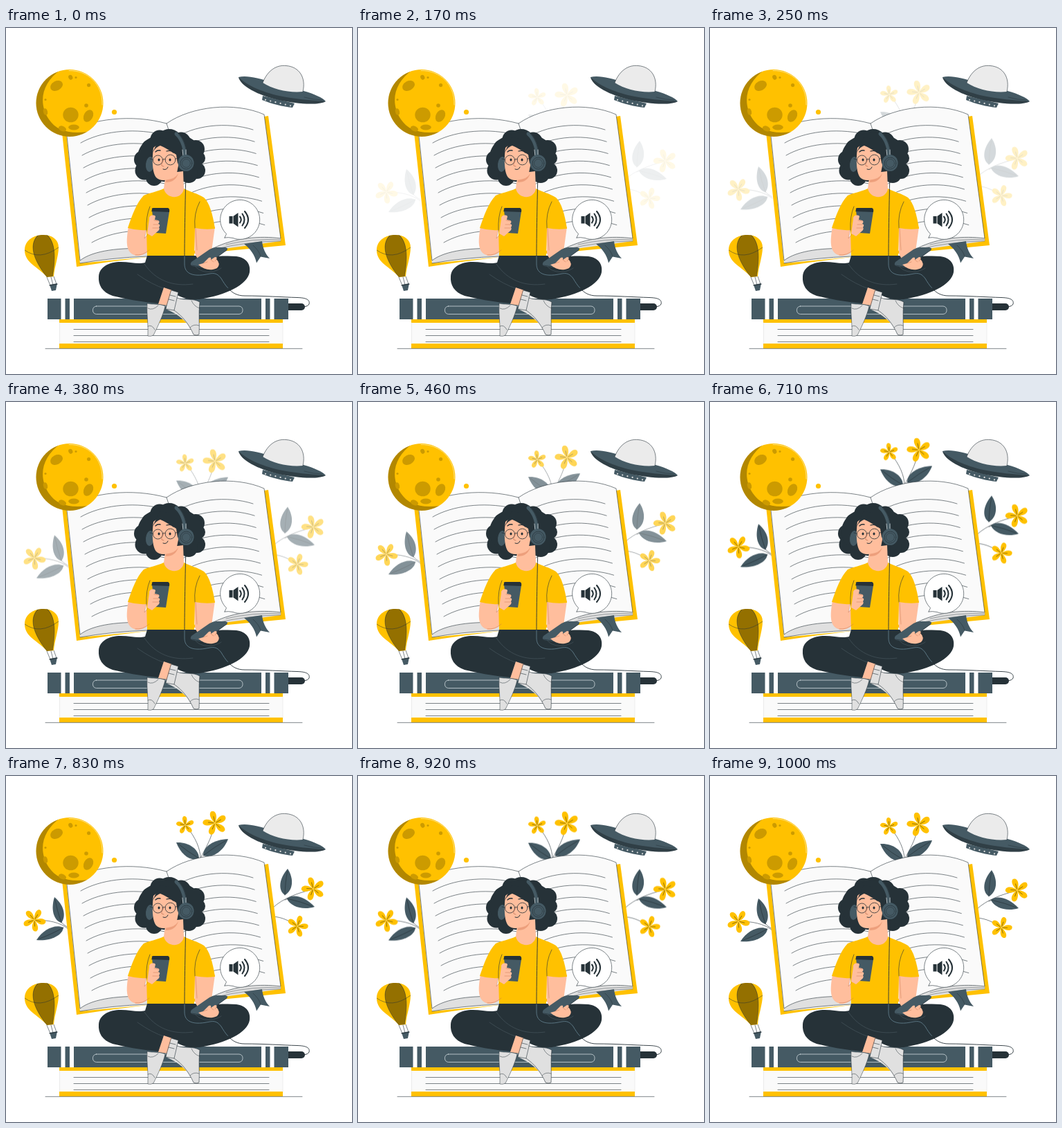
Recreate the animation shown at these times as an HTML page with a canvas. Size 500x500 px, loop 1.04 s.

```html
<!DOCTYPE html>
<html lang="en">
<head>
<meta charset="utf-8">
<title>Audiobook</title>
<style>
html, body { margin: 0; width: 100%; height: 100%; overflow: hidden; background: #fff; }
canvas { display: block; width: 500px; height: 500px; }
</style>
</head>
<body>
<canvas id="stage"></canvas>
<script>
const SIZE = 500, LOOP = 1040, FPS = 24;
const YELLOW = '#ffc100', SLATE = '#455a64', DARK = '#263238';
const SKIN = '#ffbe9d', PAPER = '#fafafa', GREY = '#e0e0e0', SHADE = 'rgba(0,0,0,.2)', DEEP = 'rgba(0,0,0,.3)';
const dpr = window.devicePixelRatio || 1;
const stage = document.getElementById('stage');
const view = setup(stage);
let c;

function setup(canvas) {
  canvas.width = canvas.height = SIZE * dpr;
  const g = canvas.getContext('2d');
  g.scale(dpr, dpr);
  g.lineCap = g.lineJoin = 'round';
  return g;
}

function layer(draw) {
  const canvas = document.createElement('canvas');
  c = setup(canvas);
  draw();
  return canvas;
}

function fill(color, d) {
  c.fillStyle = color;
  c.fill(new Path2D(d));
}

function line(d, width = .6, color = DARK) {
  c.strokeStyle = color;
  c.lineWidth = width;
  c.stroke(new Path2D(d));
}

function oval(color, x, y, rx, ry = rx, deg = 0) {
  c.fillStyle = color;
  c.beginPath();
  c.ellipse(x, y, rx, ry, deg * Math.PI / 180, 0, 7);
  c.fill();
}

function ring(x, y, r, width = .6, color = DARK) {
  c.strokeStyle = color;
  c.lineWidth = width;
  c.beginPath();
  c.arc(x, y, r, 0, 7);
  c.stroke();
}

function box(color, x, y, w, h) {
  c.fillStyle = color;
  c.fillRect(x, y, w, h);
}

function at(x, y, deg, draw) {
  c.save();
  c.translate(x, y);
  c.rotate(deg * Math.PI / 180);
  draw();
  c.restore();
}

function leaf(x, y, tipX, tipY, w) {
  const len = Math.hypot(tipX - x, tipY - y);
  const deg = Math.atan2(tipY - y, tipX - x) * 180 / Math.PI;
  at(x, y, deg, () => {
    fill(SLATE, `M0 0C${len * .15} ${-w} ${len * .6} ${-w} ${len} 0C${len * .65} ${w} ${len * .2} ${w} 0 0`);
    line(`M0 0Q${len * .5} -1.5 ${len * .9} 0`, .6);
  });
}

function flower(x, y, r, deg) {
  for (let i = 0; i < 5; i++) at(x, y, deg + i * 72, () => {
    fill(YELLOW, `M0 0C${-r * .2} ${-r * .25} ${-r * .42} ${-r * .8} ${-r * .12} ${-r}C${r * .25} ${-r * 1.08} ${r * .4} ${-r * .55} 0 0`);
    line(`M0 ${-r * .12}L0 ${-r * .55}`, .8, '#806100');
  });
}

function plants() {
  line('M281 121C281 107 274 91 261 75M281 121C287 108 297 94 301 72');
  leaf(279, 121, 246, 98, 11);
  leaf(285, 117, 321, 93, 11);
  flower(259, 73, 13, -4);
  flower(302, 70, 17.5, -12);

  line('M90 223C78 213 60 210 42 210M90 221Q82 217 79 212');
  leaf(80, 214, 70, 177, 10);
  leaf(83, 221, 44, 239, 10);
  flower(41, 210, 16.5, 32);

  line('M386 192C400 179 421 171 443 166M386 205C400 206 411 212 420 219M403 181Q409 178 414 181');
  leaf(403, 174, 407, 136, 11);
  leaf(406, 179, 446, 191, 10);
  flower(444, 165, 17, -15);
  flower(421, 219, 15.5, 20);
}

function openBook() {
  fill(YELLOW, 'M81 151L102 345Q153 337 204 331L310 323L404 314L379 127L373 128Z');
  fill(PAPER, 'M87 151C125 131 181 124 232 138C268 113 330 106 373 125L397 305L204 331L107 340Z');
  fill(GREY, 'M107 336C126 321 167 317 204 319V330Q152 332 107 340Z');
  fill(GREY, 'M300 318C330 303 367 300 397 304V308L300 321Z');
  line('M87 151C125 131 181 124 232 138C268 113 330 106 373 125L397 304C367 300 330 303 300 318M88 156L107 336C126 321 167 317 204 319M107 340Q152 332 204 330M232 138L236 150');
  line('M300 320Q350 308 397 308M318 313Q356 304 397 306', .4);
  for (let i = 0; i < 9; i++) {
    line(`M${108 + 2 * i} ${166 + 18 * i}c28 -16 72 -22 114 -13`);
    line(`M${241 + 2.1 * i} ${161 + 17.2 * i}c30 -21 78 -26 116 -14`);
  }
  fill(SLATE, 'M344 312L370 308C371 318 375 327 381 333L368 330.5L362 339.5C360 328 352 318 344 312Z');
  line('M357 314Q366 322 368 330', .5);
}

function moon() {
  c.save();
  c.clip(new Path2D('M43.5 108.5a48.5 48.5 0 1 0 97 0a48.5 48.5 0 1 0 -97 0'));
  box(YELLOW, 43, 59, 98, 99);
  fill(DEEP, 'M82 58C53 77 45 106 62 132C72 147 90 154 118 150L104 162H40V58Z');
  oval('#cc9a00', 73, 83.5, 9.5, 6.8, -28);
  oval(SHADE, 93.3, 71.3, 3, 3.6, -25);
  oval(SHADE, 101, 71.5, 1.6);
  oval(SHADE, 119.6, 82.6, 2.6);
  oval(SHADE, 93.5, 125.5, 11.2, 10.8);
  oval(SHADE, 119, 127, 6.5, 9.3, 28);
  oval(SHADE, 98, 143.5, 7.8, 4);
  oval('#cc9a00', 81.5, 145.5, 5.8, 3.7, 25);
  oval(SHADE, 116, 112, 2.8);
  oval('#cc9a00', 57, 121, 3, 4.8, -15);
  oval(SHADE, 57, 103.5, 1.6);
  c.restore();
  line('M91 61.5C119 61 140 82 139 111', .7, '#fff1bd');
  oval(YELLOW, 156.5, 121.5, 3.6);
}

function saucer() {
  fill(SLATE, 'M371 98L370 104C382 109 401 114 414 115L417 109Z');
  for (let i = 0; i < 6; i++) oval(GREY, 375 + i * 7.2, 103.8 + i * 1.7, 1.1);
  fill(SLATE, 'M336 71C347 68 365 72 385 79L430 91C445 95 458 101 462 106C451 112 421 110 394 104C364 97 339 84 336 71Z');
  fill(DEEP, 'M336 71C349 84 374 94 400 99C427 104 449 105 462 106C451 112 421 110 394 104C364 97 339 84 336 71Z');
  fill('#ebebeb', 'M371 79C378 61 391 53 405 54.5C424 56 434 72 429 92C410 94 386 89 371 79Z');
  line('M371 79C378 61 391 53 405 54.5C424 56 434 72 429 92');
  line('M431 100Q445 104 457 104', .5);
}

function balloon() {
  const shell = 'M27 321C27 306 41 299 54 299C67 299 76 306 76 317C76 330 70 345 69 359L59 360C47 345 27 340 27 321Z';
  fill('#fff', 'M59 360L69 359L73 370L64 372Z');
  line('M59 360L64 372M69 359L73 370M65 360L68 371', .6);
  fill(YELLOW, shell);
  c.save();
  c.clip(new Path2D(shell));
  fill('rgba(0,0,0,.42)', 'M47 298C32 312 39 335 60 361L67 360C71 335 73 311 59 298Z');
  line('M47 299C32 312 39 335 60 361M59 299C73 311 71 335 67 360M27 321Q49 337 76 317', .5);
  c.restore();
  fill(SLATE, 'M63 371L74 369L72 379L66 380Z');
  line('M63 372L74 370', 1.2);
}

function closedBook() {
  box(YELLOW, 77, 421, 323, 42);
  box(PAPER, 77, 426, 323, 30);
  line('M98 435.5H380M98 444.5H380M98 453.5H380', .6);
  line('M77.5 426V456M400 426V456', .4, '#d5d5d5');
  box(SLATE, 60, 391, 348, 30);
  for (const x of [79.5, 92, 369, 381.5]) box('#fff', x, 391, 6, 30);
  line('M130.5 402H337A5.8 5.8 0 0 1 337 413.5H130.5A5.8 5.8 0 0 1 130.5 402Z', .8, '#cfd8dc');
  line('M57 463.3H428', .6);
  fill(DARK, 'M408 398H427A5 5 0 0 1 427 408H408Z');
}

function legs() {
  fill(DARK, 'M204 329H273C290 332 315 328 333 330C347 332 354 341 352 353C349 371 318 386 280 392C266 394 250 390 239 380L226 398C206 398 170 391 154 387C139 382 133 371 134 359C135 345 149 338 166 338C180 338 191 342 201 339Z');
  line('M200 341C216 365 241 374 270 370M274 345C282 355 301 354 311 347M190 356Q211 371 230 377', .5, '#52636b');
  fill(SKIN, 'M228 375L240 379L234 401L220 399Z');
  fill(GREY, 'M204 398C211 400 223 398 230 402C227 415 220 430 213 444Q209 446 205 445C206 430 203 414 204 398Z');
  fill(GREY, 'M239 379L249 382L247 390C258 394 270 390 280 396C278 413 280 429 279 443Q275 445 271 443C265 429 255 416 231 406Z');
  line('M239 379L249 382L243 408L231 406ZM245 388L237 386M243 394L235 392M247 390C258 394 270 390 280 396C278 413 280 429 279 443Q275 445 271 443C265 429 255 416 243 408');
  line('M204 398C211 400 223 398 230 402C227 415 220 430 213 444Q209 446 205 445C206 430 203 414 204 398M205 431Q211 428 215 436M266 433Q271 427 279 430M268 394Q272 403 280 405M205 405Q212 409 220 401', .5);
}

function body() {
  fill(SKIN, 'M177 287C174 304 173 318 180 325C188 332 199 330 208 320L222 297L210 291L200 304L203 290Z');
  fill(SKIN, 'M272 287H302L297 323L303 329L280 340L273 326Z');
  fill(YELLOW, 'M228 232C218 237 207 238 199 242C189 252 182 271 176 289Q190 293 203 292L204 329H272L273 289Q288 292 302 290C299 270 294 252 286 245C277 239 266 237 257 232Z');
  line('M208 258Q202 272 203 292M273 289Q271 268 280 251', .6);
  line('M187 328Q198 329 207 321M203 292L200 304L207 296M274 290L276 321', .5, '#c87955');
  fill(SLATE, 'M211 264L236 265L231 297L215 296Z');
  fill(DARK, 'M211 263Q210 260 213 260H234Q237 261 236 266L210 265Z');
  fill(SKIN, 'M207 276C206 271 213 269 216 272L215 277L220 278Q223 280 220 283Q224 284 221 288Q223 291 219 294L211 301L204 297Z');
  line('M214 278L220 279M213 284H220M212 289L220 289', .5, '#c87955');
  fill(SLATE, 'M268 338L294 320Q299 317 304 317L317 317Q322 318 319 321L291 342Q286 346 281 346L269 344Q265 342 268 338Z');
  line('M268 343L281 345Q286 345 291 341L319 321', .7);
  fill(SKIN, 'M278 342L285 340L293 332Q297 330 296 335L302 331Q306 331 304 334Q311 341 305 347C296 351 287 350 278 342Z');
  line('M285 340L291 338M296 335L300 338M304 334L302 337', .5, '#c87955');
}

function cable() {
  line('M260 207C259 250 258 300 258 330', .9);
  line('M258 330V341C258 354 268 358 282 357C296 356 302 350 311 362C314 367 317 372 321 376', .9, '#607d8b');
  line('M321 376C327 383 334 387 345 387C374 387 399 389 421 389.5C437 390 439 394 438 399Q437 402 431 403', .9);
}

function head() {
  const curls = [[236, 165, 19], [222, 161, 13.5], [208, 173, 12], [198, 190, 13], [200, 206, 13.5], [214, 216, 12],
    [253, 164, 13.5], [274, 175, 13], [278, 188, 10], [276, 206, 12], [264, 211, 13], [250, 212, 12]];
  for (const [x, y, r] of curls) oval(DARK, x, y, r);
  oval(DARK, 237, 187, 47, 36);
  oval(SLATE, 208, 197, 6, 11, 5);
  fill(SKIN, 'M231 210L228 232C231 247 253 249 257 233L256 207Z');
  fill('#ed9f7c', 'M231 219Q244 219 249 210Q245 223 231 223Z');
  fill(SKIN, 'M213 173C211 189 211 209 217 216C224 223 239 221 247 209L250 194V168L222 166Z');
  fill(DARK, 'M211 182C214 176 217 172 223 170C229 172 238 178 246 183L248 196L257 187L254 162L222 158Z');
  line('M216 179Q219 176 223 177M232 178Q238 176 242 180', 1.3);
  ring(219.5, 191, 7, .8);
  ring(237.5, 190.5, 7.4, .8);
  line('M226.5 190Q228.5 188 230.2 190M245 189L253 187M212 190L208 189', .8);
  oval(DARK, 221, 190.5, 1.5, 1.9);
  oval(DARK, 237, 190.5, 1.5, 1.9);
  line('M228 190Q224 197 225 199L228 200', .6, '#b46347');
  line('M227 204Q232 206 234 201', 1);
  line('M246 153C254 160 258 171 259 185', 5, SLATE);
  line('M249 153C257 161 260 172 261 184', .6);
  line('M255 176L256 185M260 176L260 185', 1, '#b7c2c7');
  oval(SLATE, 260, 195, 11.5, 12);
  ring(260.5, 195.5, 8.5, .7);
  ring(260.5, 195.5, 6, .5);
}

function bubble() {
  const d = 'M316 303L318.5 297.5A28.5 28.5 0 1 1 328 303.5Q321 302 316 303Z';
  fill('#fff', d);
  line(d, .6);
  box(DARK, 322.5, 272, 5, 10.5);
  fill(DARK, 'M328.5 272L335.5 267V287.5L328.5 282.5Z');
  line('M338 272.5Q341.5 277 338 281.5M341.5 268.5Q347.5 277 341.5 285.5M345 265Q355 277 345 289', 2.1);
}

function scene() {
  openBook();
  moon();
  saucer();
  balloon();
  closedBook();
  legs();
  body();
  head();
  cable();
  bubble();
}

// y of cubic-bezier(.36, -.01, .5, 1.38) at x
function ease(x) {
  const bez = (a, b, s) => 3 * a * s * (1 - s) ** 2 + 3 * b * s * s * (1 - s) + s ** 3;
  let lo = 0, hi = 1;
  for (let i = 0; i < 24; i++) {
    const mid = (lo + hi) / 2;
    if (bez(.36, .5, mid) < x) lo = mid; else hi = mid;
  }
  return bez(-.01, 1.38, lo);
}

const plantLayer = layer(plants), sceneLayer = layer(scene);
const start = performance.now();

function frame(now) {
  const t = Math.max(0, now - start) % LOOP;
  const step = Math.min(FPS, Math.floor((t + 5) * FPS / 1000));
  const p = step < 2 ? 0 : step === FPS ? 1 : ease(step / FPS);
  view.globalAlpha = 1;
  view.fillStyle = '#fff';
  view.fillRect(0, 0, SIZE, SIZE);
  view.globalAlpha = Math.max(0, Math.min(1, p));
  view.drawImage(plantLayer, 0, 30 * (1 - p), SIZE, SIZE);
  view.globalAlpha = 1;
  view.drawImage(sceneLayer, 0, 0, SIZE, SIZE);
  requestAnimationFrame(frame);
}
frame(start);
</script>
</body>
</html>
```
